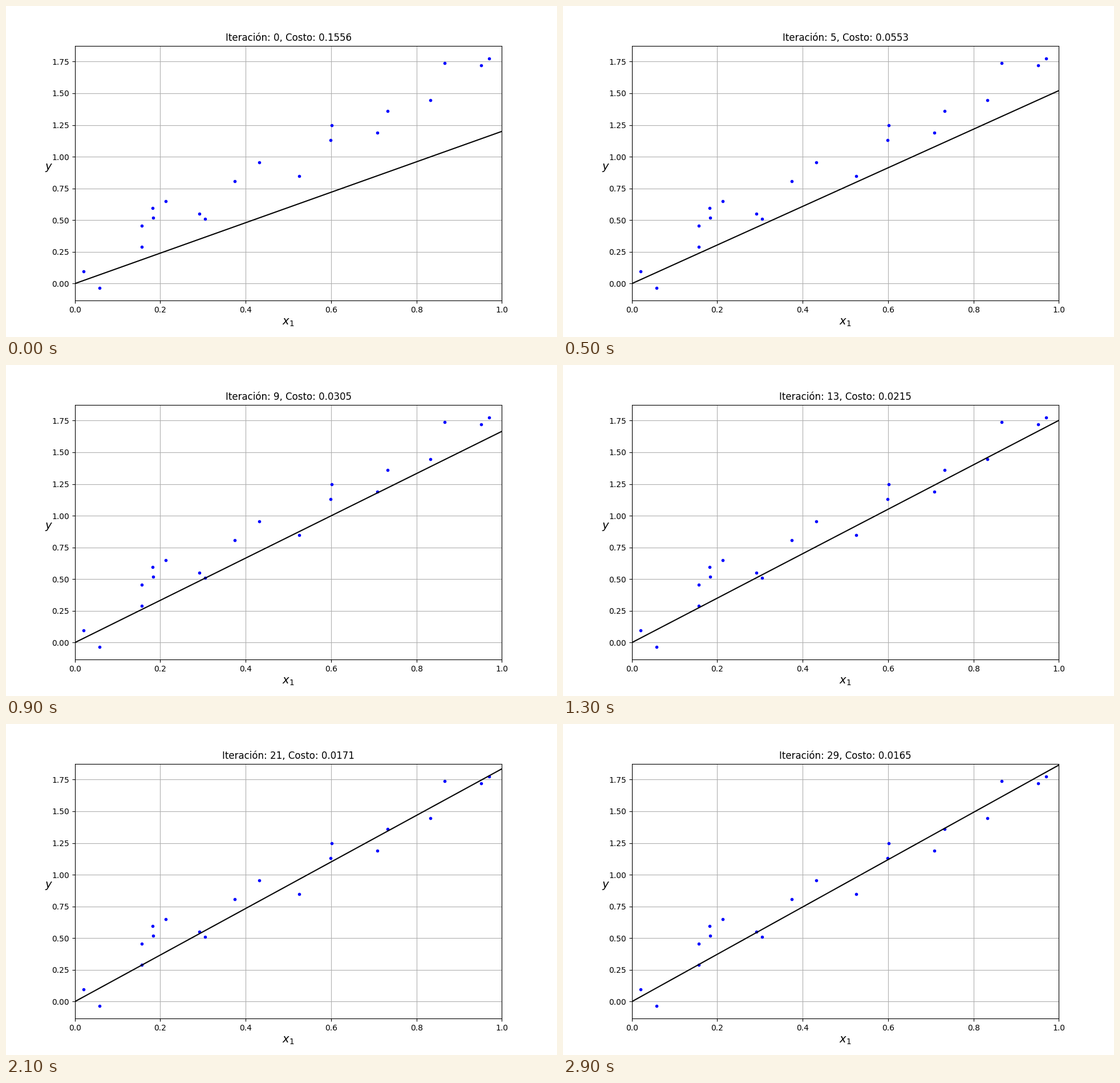
Write a matplotlib script that moves like this. It is 966 px wide and 580 px high and loops after 3 s.

```python
import numpy as np
import matplotlib.pyplot as plt
from matplotlib.animation import FuncAnimation

N_POINTS = 20
N_FRAMES = 30
INTERVAL = 100
RATE = 0.2
START_SLOPE = 1.2

# Noisy samples around y = 2x
rng = np.random.RandomState(42)
x = rng.rand(N_POINTS)
y = 2 * x + (rng.rand(N_POINTS) - 0.5) / 2


def cost(w):
    return np.mean((w * x - y) ** 2)


def descend(w, steps):
    """Slope after the given number of gradient descent steps."""
    for _ in range(steps):
        w -= RATE * 2 * np.mean((w * x - y) * x)
    return w


fig, ax = plt.subplots(figsize=(9.66, 5.8), dpi=100)
ax.plot(x, y, "b.")
line, = ax.plot([0, 1], [0, START_SLOPE], "k-")
ax.set_xlim(0, 1)
ax.set_ylim(y.min() - 0.1, y.max() + 0.1)
ax.set_xlabel("$x_1$", fontsize=14)
ax.set_ylabel("$y$", fontsize=14, rotation=0)
ax.grid(True)
title = ax.set_title("")


def update(step):
    w = descend(START_SLOPE, step)
    line.set_ydata([0, w])
    title.set_text(f"Iteración: {step}, Costo: {cost(w):.4f}")
    return line, title


anim = FuncAnimation(fig, update, frames=N_FRAMES, interval=INTERVAL,
                     repeat=True, repeat_delay=0, blit=False)
plt.show()
```
